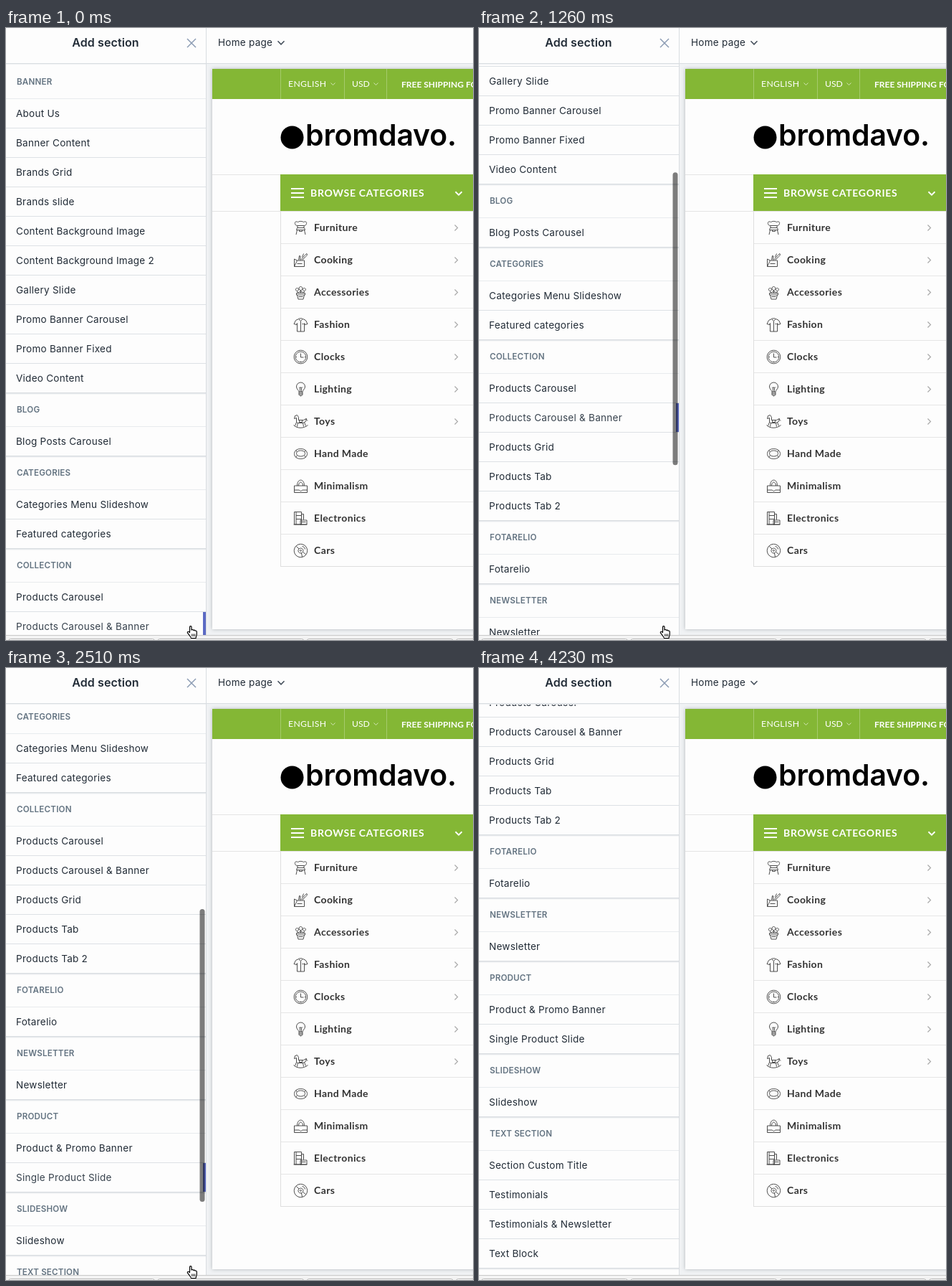
An HTML page with a canvas for the animation above (4.4 s loop, 652x853 px).

```html
<!DOCTYPE html>
<html lang="en">
<head>
<meta charset="utf-8">
<title>Add section</title>
<style>
html, body { margin: 0; width: 100%; height: 100%; overflow: hidden; background: #fdfdfd; }
canvas { display: block; width: 652px; height: 853px; }
</style>
</head>
<body>
<canvas id="stage"></canvas>
<script>
const W = 652, H = 853, LOOP = 4400;
const canvas = document.getElementById('stage');
const ctx = canvas.getContext('2d');
const dpr = window.devicePixelRatio || 1;
canvas.width = W * dpr;
canvas.height = H * dpr;

const PAPER = '#fdfdfd', GREEN = '#84b735', INK = '#212b36', ROW = 41, HEAD = 47;

const sections = [
  ['BANNER', 'About Us', 'Banner Content', 'Brands Grid', 'Brands slide', 'Content Background Image',
    'Content Background Image 2', 'Gallery Slide', 'Promo Banner Carousel', 'Promo Banner Fixed', 'Video Content'],
  ['BLOG', 'Blog Posts Carousel'],
  ['CATEGORIES', 'Categories Menu Slideshow', 'Featured categories'],
  ['COLLECTION', 'Products Carousel', 'Products Carousel & Banner', 'Products Grid', 'Products Tab', 'Products Tab 2'],
  ['FOTARELIO', 'Fotarelio'],
  ['NEWSLETTER', 'Newsletter'],
  ['PRODUCT', 'Product & Promo Banner', 'Single Product Slide'],
  ['SLIDESHOW', 'Slideshow'],
  ['TEXT SECTION', 'Section Custom Title', 'Testimonials', 'Testimonials & Newsletter', 'Text Block']
];

// Menu entries with line icons in a 20 x 20 box
const menu = [
  ['Furniture', 'M2 4C1 1 5 1 6 2C8 .5 12 .5 14 2C15 1 19 1 18 4C18 6 16 7 15 7H5C4 7 2 6 2 4ZM5 7L6 10M15 7L14 10M5 10H15L16 13H4ZM5 13L3.5 19.5M15 13L16.5 19.5M8 13V15H12V13'],
  ['Cooking', 'M1 8.5L5 10.5H15V19H1ZM5 10.5L1 19M7 10L8 4L9.5 4.5L9 10M10 10L16 3L18.5 1L19 3L17 5L12 10M14 1L12 6M5 15H12'],
  ['Accessories', 'M4 11H16V13.5H4ZM5 13.5L6.5 19.5H13.5L15 13.5M10 11V7M6 11L5 8M14 11L15 8M10 2A2.5 2.5 0 1 1 9.9 2M5 4A2 2 0 1 1 4.9 4M15 4A2 2 0 1 1 14.9 4M7 10L10 8L13 10M7 16H13'],
  ['Fashion', 'M7 2L3 4L.5 9L4 10L5 8V19.5H15V8L16 10L19.5 9L17 4L13 2C12 1 8 1 7 2L10 5L13 2M10 5V19.5M12 9H14'],
  ['Clocks', 'M10 .7A9.3 9.3 0 1 1 9.9 .7M10 2.7A7.3 7.3 0 1 1 9.9 2.7M10 5V10.5H14M10 16V17M3.5 10H4.5M15.5 10H16.5'],
  ['Lighting', 'M7.5 14C7.5 11 4 10 4 6.5A6 6 0 0 1 16 6.5C16 10 12.5 11 12.5 14ZM7.5 14V18H12.5V14M7.5 16H12.5M9 19.5H11M8 7L9 9L10 7L11 9L12 7M9 9V14M11 9V14'],
  ['Toys', 'M2 2L5 1L7 4L7 8H14L18 6L17 10L15 11L17 16M2 2L1 6L4 5L4 11L2 16M6 12L5 17M13 12L14 17M4 11L6 12H13L15 11M0 15C5 20 14 20 20 15M8 8V11H12V8M17 6L19.5 9'],
  ['Hand Made', 'M10 3C22 3 22 17 10 17C-2 17 -2 3 10 3ZM10 5.5C18 5.5 18 13.5 10 13.5C2 13.5 2 5.5 10 5.5ZM3 5L5 7.5M17 5L15 7.5M3 15L5 12M17 15L15 12'],
  ['Minimalism', 'M1 9.5H19V19H1ZM5 9.5C5 -1 15 -1 15 9.5M7 9.5C7 3 13 3 13 9.5M1 15.5H8L10 17.5L12 15.5H19'],
  ['Electronics', 'M1 1H11V18.5H1ZM3.5 1V18.5M3.5 6H11M3.5 11H11M11 4H14V12M9.5 12.5H18.5V18.5H9.5ZM11 15H17M0 18.5H19'],
  ['Cars', 'M10 .8A9.2 9.2 0 1 1 9.9 .8M10 6.5A3.5 3.5 0 1 1 9.9 6.5M10 9A1 1 0 1 1 9.9 9M4 4L7.5 7.5M11 13.5L12 18.5M13 12L17 15M12 4C14 4 16 6 16 8']
].map(([name, d]) => [name, new Path2D(d)]);

const hand = new Path2D('M4 10V2.4C4 .6 6.5 .6 6.5 2.4V6.6C7 5.6 8.8 5.8 9 7C9.8 6.2 11.2 6.5 11.4 7.7' +
  'C12.6 7.2 13.8 7.8 13.8 9V12.5C13.8 14.5 12.6 15.4 12.6 18H6C5.6 15.6 2.6 13 1 10.6C.2 9.2 2 8.2 3 9.2Z');
const arrow = new Path2D('M0 0V13.4L3.1 10.5L5.6 16.2L8 15.2L5.5 9.7H9.8Z');

// Repaint bursts: first step, last step, number of steps
const bursts = [[510, 990, 6], [1080, 1560, 7], [1650, 2160, 7], [2270, 2770, 7],
  [2860, 3350, 6], [3470, 3700, 3], [3880, 4230, 6]];

const scrollKeys = [[450, 0], [894, 161], [1400, 324], [1520, 330], [1600, 330], [1900, 444], [1990, 448],
  [2190, 448], [2500, 585], [2770, 705], [2960, 745]];
const liftKeys = [[2880, 0], [3150, 4], [3400, 4], [3700, 0]];
const thumbKeys = [[509, 0], [510, 1], [1920, 1], [2130, 0], [2269, 0], [2270, 1], [3050, 1], [3260, 0]];

function snap(t) {
  let out = 0;
  for (const [a, b, n] of bursts) {
    if (t < a) break;
    const step = (b - a) / (n - 1);
    out = a + step * Math.min(n - 1, Math.floor((t - a) / step + 1e-6));
  }
  return out;
}

function linear(keys, t) {
  if (t <= keys[0][0]) return keys[0][1];
  for (let i = 1; i < keys.length; i++) {
    const [t0, v0] = keys[i - 1], [t1, v1] = keys[i];
    if (t <= t1) return v0 + (v1 - v0) * (t - t0) / (t1 - t0);
  }
  return keys[keys.length - 1][1];
}

// Monotone cubic through rising keys
function smooth(keys, t) {
  const last = keys.length - 1;
  if (t <= keys[0][0]) return keys[0][1];
  if (t >= keys[last][0]) return keys[last][1];
  const slope = i => (keys[i + 1][1] - keys[i][1]) / (keys[i + 1][0] - keys[i][0]);
  const tangent = i => {
    if (i === 0 || i === last) return 0;
    const a = slope(i - 1), b = slope(i);
    return a * b > 0 ? 2 * a * b / (a + b) : 0;
  };
  let i = 0;
  while (t > keys[i + 1][0]) i++;
  const [t0, v0] = keys[i], [t1, v1] = keys[i + 1];
  const h = t1 - t0, u = (t - t0) / h, w = 1 - u;
  return v0 * (1 + 2 * u) * w * w + v1 * u * u * (3 - 2 * u) +
    h * u * w * (tangent(i) * w - tangent(i + 1) * u);
}

function rect(x, y, w, h, color) {
  ctx.fillStyle = color;
  ctx.fillRect(x, y, w, h);
}

function text(str, x, y, font, color, spacing = 0) {
  ctx.font = font;
  ctx.letterSpacing = spacing + 'px';
  ctx.fillStyle = color;
  ctx.fillText(str, x, y);
}

const inter = (str, x, y, size, weight, color, spacing = 0.27) =>
  text(str, x, y, `${weight} ${size}px Inter, sans-serif`, color, spacing);
const lato = (str, x, y, size, weight, color, spacing = 0.38) =>
  text(str, x, y, `${weight} ${size}px Lato, sans-serif`, color, spacing);

function line(color, width, ...points) {
  ctx.strokeStyle = color;
  ctx.lineWidth = width;
  ctx.beginPath();
  points.forEach(([x, y]) => ctx.lineTo(x, y));
  ctx.stroke();
}

const chevron = (x, y, r, color, width) =>
  line(color, width, [x - r, y - r / 2], [x, y + r / 2], [x + r, y - r / 2]);

function clipTo(x, y, w, h, draw) {
  ctx.save();
  ctx.beginPath();
  ctx.rect(x, y, w, h);
  ctx.clip();
  draw();
  ctx.restore();
}

function drawList(scroll, hover) {
  rect(0, 50, 279, 800, PAPER);
  let y = 51 - scroll;
  for (const [title, ...items] of sections) {
    inter(title, 15, y + 28, 11.6, 600, '#637381', 0.2);
    y += HEAD;
    rect(0, y, 279, 1, '#e8ebee');
    items.forEach((name, i) => {
      const on = name === hover;
      inter(name, 14, y + 26, 13.5, 400, on ? '#37424d' : INK);
      if (on) rect(275, y + 1, 4, ROW - 1, '#5c6ac4');
      y += ROW;
      if (i < items.length - 1) rect(0, y, 279, 1, '#dde1e5');
    });
    rect(0, y, 279, 1, '#d9dde1');
    rect(0, y + 1, 279, 1, '#e6e9ec');
    rect(0, y + 2, 279, 1, '#f5f6f7');
  }
}

function drawThumb(scroll, alpha) {
  if (alpha <= 0) return;
  ctx.fillStyle = `rgba(0, 0, 0, ${0.51 * alpha})`;
  ctx.beginPath();
  ctx.roundRect(270.5, 51 + scroll * 0.5165, 7, 408, 3.5);
  ctx.fill();
}

function drawHeader() {
  rect(0, -6, W, 55, PAPER);
  rect(0, 49, W, 1, '#d9dde1');
  rect(0, 50, 279, 1, '#f0f2f4');
  ctx.textAlign = 'center';
  inter('Add section', 139, 26, 16, 600, INK, 0.1);
  ctx.textAlign = 'left';
  line('#8b9bb3', 1.5, [253, 15], [265, 27]);
  line('#8b9bb3', 1.5, [265, 15], [253, 27]);
  inter('Home page', 296, 25, 13.5, 400, INK);
  chevron(384, 20.5, 4.5, '#454f5b', 1.6);
}

function drawShop() {
  rect(280, 50, W - 280, 810, '#f0f2f4');
  ctx.save();
  ctx.shadowColor = 'rgba(33, 43, 54, 0.3)';
  ctx.shadowBlur = 5 * dpr;
  rect(288, 57, 400, 781, PAPER);
  ctx.restore();

  rect(288, 57, 364, 42, GREEN);
  [383, 472, 531].forEach(x => rect(x, 57, 1, 42, '#a5cb6b'));
  lato('ENGLISH', 394, 82, 12.2, 400, '#fff', 0.35);
  lato('USD', 483, 82, 12.2, 400, '#fff', 0);
  chevron(456.5, 78, 3, '#d3e5b8', 1);
  chevron(516.5, 78, 3, '#d3e5b8', 1);
  lato('FREE SHIPPING FOR ALL ORDERS', 552, 83, 12, 700, '#fff', 0);

  ctx.fillStyle = '#000';
  ctx.beginPath();
  ctx.arc(399.5, 152.5, 16, 0, Math.PI * 2);
  ctx.fill();
  text('bromdavo.', 418, 164, '600 41px Inter, sans-serif', '#000', -0.2);

  rect(288, 204, 364, 1, '#e4e4e4');
  rect(288, 255, 364, 1, '#e4e4e4');
  rect(383, 204, 269, 51, GREEN);
  [223, 229, 235].forEach(y => rect(398, y, 18, 2, '#fff'));
  lato('BROWSE CATEGORIES', 425, 235, 14, 700, '#fff', 0.7);
  chevron(632, 230.5, 4.5, '#fff', 1.8);

  rect(383, 255, 1, 496, '#dedede');
  menu.forEach(([name, icon], i) => {
    const y = 278 + i * 45;
    lato(name, 430, y + 5, 14, 700, '#333');
    rect(384, y + 22, 268, 1, i === menu.length - 1 ? '#dedede' : '#e6e6e6');
    if (i < 7) line('#a8a8a8', 1.2, [626.5, y - 3.5], [630.5, y + 0.5], [626.5, y + 4.5]);
    ctx.save();
    ctx.translate(401.5, y - 9.5);
    ctx.strokeStyle = '#444';
    ctx.lineWidth = 0.95;
    ctx.stroke(icon);
    ctx.restore();
  });
}

function drawTabs() {
  rect(0, 846, W, 7, '#f3f3f3');
  rect(0, 846, W, 1, '#c9c9c9');
  ctx.fillStyle = '#fff';
  ctx.strokeStyle = '#b5b5b5';
  ctx.lineWidth = 1;
  for (let x = 3.5; x < W; x += 208.3) {
    ctx.beginPath();
    ctx.roundRect(x, 851.5, 204, 20, 3);
    ctx.fill();
    ctx.stroke();
  }
}

function drawCursor(shape, x, y) {
  ctx.save();
  ctx.translate(x, y);
  ctx.lineJoin = 'round';
  if (shape === hand) {
    ctx.fillStyle = '#fff';
    ctx.fill(hand);
    ctx.strokeStyle = '#000';
    ctx.lineWidth = 1.2;
    ctx.stroke(hand);
    [7.2, 9.2, 11.2].forEach(k => line('#000', 0.9, [k, 12], [k, 15.5]));
  } else {
    ctx.strokeStyle = '#fff';
    ctx.lineWidth = 2;
    ctx.stroke(arrow);
    ctx.fillStyle = '#000';
    ctx.fill(arrow);
  }
  ctx.restore();
}

function hovered(t) {
  if (t < 1450) return 'Products Carousel & Banner';
  if (t < 2050) return '';
  if (t < 3100) return 'Single Product Slide';
  return t < 3580 ? 'Text Block' : '';
}

function pointer(t) {
  if (t >= 1450 && t < 2050) drawCursor(arrow, 257, 831);
  else if (t < 3580) drawCursor(hand, 252.5, 832.5);
  else if (t >= 3880 && t < 4200) {
    const u = (t - 3880) / 280;
    drawCursor(arrow, 538 + 89 * u, 850 - 17 * Math.sin(Math.PI * u));
  }
}

function draw(now) {
  const t = snap(now % LOOP);
  const scroll = Math.round(smooth(scrollKeys, t));
  const lift = Math.round(linear(liftKeys, t));
  ctx.setTransform(dpr, 0, 0, dpr, 0, 0);
  rect(0, 0, W, H, PAPER);
  ctx.save();
  ctx.translate(0, -lift);
  clipTo(280, 0, W - 280, 860, drawShop);
  clipTo(0, 49, 279, 810, () => {
    drawList(scroll, hovered(t));
    drawThumb(scroll, linear(thumbKeys, t));
  });
  drawHeader();
  rect(279, 0, 1, 860, '#d9dde1');
  ctx.restore();
  drawTabs();
  pointer(t);
}

const start = performance.now();
function tick() {
  draw(performance.now() - start);
  requestAnimationFrame(tick);
}
tick();
</script>
</body>
</html>
```
